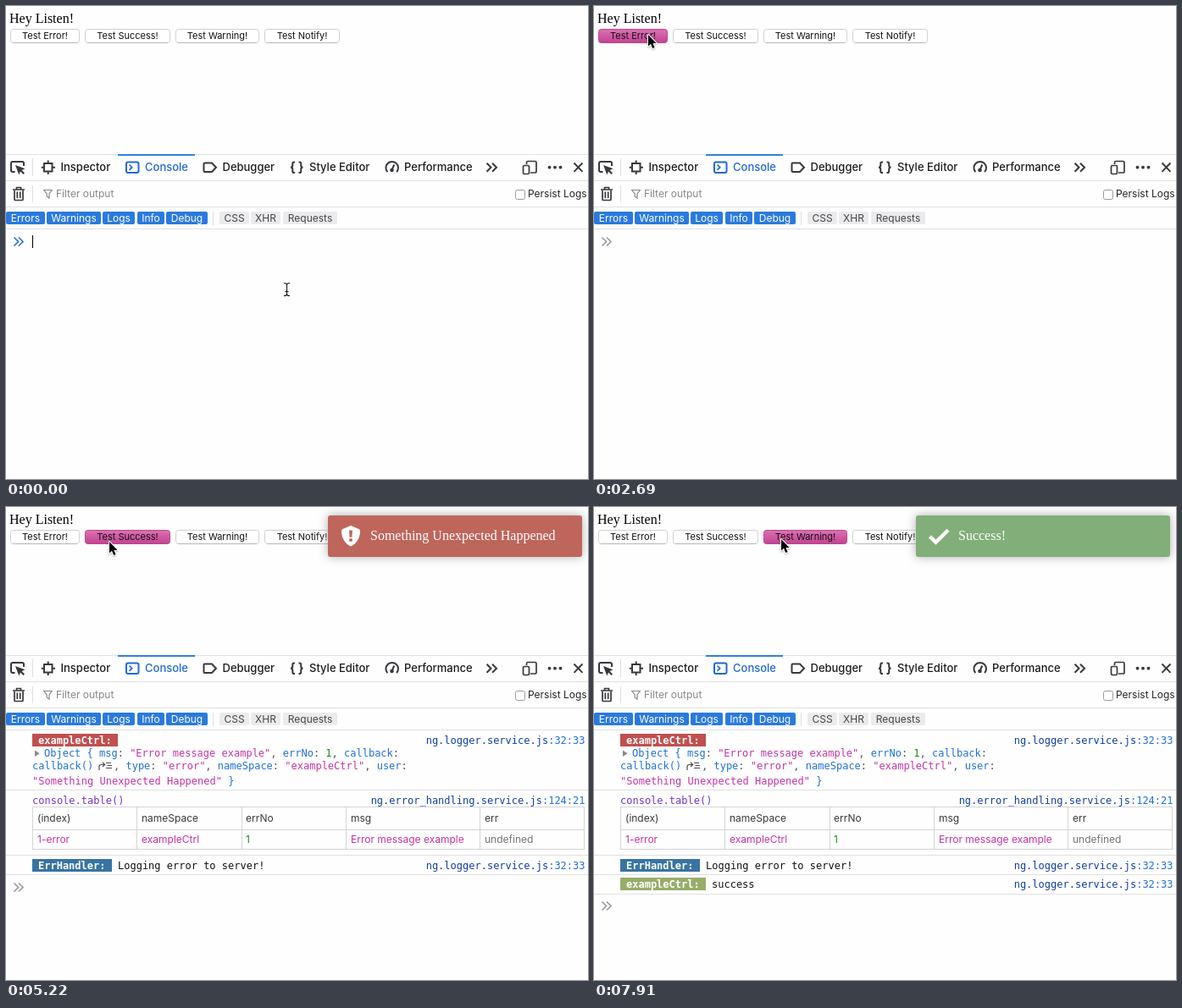
Animation of 687 by 559 pixels, one loop 8000 ms. Source, as an HTML page with a canvas:

```html
<!DOCTYPE html>
<html lang="en">
<head>
<meta charset="utf-8">
<title>Logger console demo</title>
<style>
html, body { margin: 0; width: 100%; height: 100%; overflow: hidden; background: #fefefe; }
canvas { display: block; }
</style>
</head>
<body>
<canvas id="stage" width="687" height="559"></canvas>
<script>
const c = document.getElementById('stage').getContext('2d');
const LOOP = 8000;
const UI = 'Inter, sans-serif', MONO = '"DejaVu Sans Mono", monospace', SERIF = '"Liberation Serif", serif';
const INK = '#38383d', BLUE = '#2268d8', KEY = '#1f70dd', PINK = '#c533a4', GREEN = '#198a14', LINE = '#e0e0e2';

// Pointer places: [start ms, x, y]
const POINTER = [
  [0, 331, 335], [1050, 329, 331], [1200, 311, 305], [1350, 272, 235], [1490, 212, 154],
  [1640, 84, 107], [1790, 74, 88], [1940, 66, 56], [2090, 63, 36], [2240, 64, 34],
  [4490, 67, 36], [4636, 79, 41], [4780, 98, 42], [4930, 114, 42], [5070, 122, 41],
  [6410, 126, 40], [6560, 152, 38], [6710, 190, 37], [6860, 214, 38], [7010, 221, 38]
];
const BUTTONS = [
  { label: 'Test Error!', x: 5, w: 82, press: [2690, 2840] },
  { label: 'Test Success!', x: 93, w: 101, press: [5220, 5670] },
  { label: 'Test Warning!', x: 200, w: 99, press: [7910, LOOP] },
  { label: 'Test Notify!', x: 305, w: 89, press: [LOOP, LOOP] }
];
const within = (t, [a, b]) => t >= a && t < b;

function text(s, x, y, font, color, align = 'left') {
  c.font = font;
  c.fillStyle = color;
  c.textAlign = align;
  c.fillText(s, x, y);
}

function rect(x, y, w, h, color) {
  c.fillStyle = color;
  c.fillRect(x, y, w, h);
}

function box(x, y, w, h, r, fill, stroke) {
  c.beginPath();
  c.roundRect(x, y, w, h, r);
  if (fill) { c.fillStyle = fill; c.fill(); }
  if (stroke) { c.strokeStyle = stroke; c.stroke(); }
}

function stroke(d, color, width = 2) {
  c.strokeStyle = color;
  c.lineWidth = width;
  c.stroke(new Path2D(d));
  c.lineWidth = 1;
}

function fill(d, color) {
  c.fillStyle = color;
  c.fill(new Path2D(d));
}

// Coloured monospace pieces: color, string, color, string...
function run(x, y, ...parts) {
  c.font = '12px ' + MONO;
  c.textAlign = 'left';
  for (let i = 0; i < parts.length; i += 2) {
    c.fillStyle = parts[i];
    c.fillText(parts[i + 1], x, y);
    x += c.measureText(parts[i + 1]).width;
  }
}

function source(file, pos, y) {
  c.font = '12px ' + MONO;
  run(683.5 - c.measureText(file + pos).width, y, '#103f9f', file, KEY, pos);
}

function badge(label, y, w, color) {
  rect(31, y - 12, w, 15, color);
  text(label, 38, y, 'bold 12px ' + MONO, '#fff');
}

function chevrons(x, y, h, step, color, width) {
  const one = `l${h} ${h}l${-h} ${h}`;
  stroke(`M${x} ${y - h}${one}M${x + step} ${y - h}${one}`, color, width);
}

function page(t) {
  text('Hey Listen!', 4, 20, '16px ' + SERIF, '#000');
  for (const b of BUTTONS) {
    const down = within(t, b.press);
    let face = '#fff';
    if (down) {
      face = c.createLinearGradient(0, 27, 0, 44);
      face.addColorStop(0, '#dc72b4');
      face.addColorStop(1, '#c1428f');
    }
    box(b.x + .5, 27.5, b.w - 1, 16, 3, face, down ? '#b9478c' : '#d0d0d0');
    if (!down) rect(b.x + 3, 43, b.w - 6, 1, '#b8b8b8');
    text(b.label, b.x + b.w / 2, 39, '11px ' + UI, '#111', 'center');
  }
}

function tabs() {
  for (const y of [175, 206, 237, 263]) rect(0, y, 687, 1, LINE);
  rect(31, 180, 1, 21, LINE);
  rect(31, 212, 1, 20, LINE);
  rect(132, 175, 91, 2, '#2f80e0');

  stroke('M10.5 196H8a2 2 0 0 1-2-2V186a2 2 0 0 1 2-2H19a2 2 0 0 1 2 2V189', INK);
  fill('M11 188L22.5 192.3L18.6 194L22 197.4L20.4 199L17 195.6L15.3 199.5Z', INK);
  stroke('M45 186H54.5V195.5H45ZM49.7 182.5V186M49.7 195.5V199M41.8 190.7H45M54.5 190.7H58', INK);
  c.lineWidth = 2;
  box(142, 184.5, 14.5, 12.5, 2, null, BLUE);
  stroke('M145.5 187.5L148.7 190.7L145.5 193.9', BLUE, 1.7);
  stroke('M234.5 185.5H243L248 190.7L243 196H234.5Q233.5 196 233.5 195V186.5Q233.5 185.5 234.5 185.5Z', INK);
  stroke('M341 184.5H340Q338.3 184.5 338.3 186.3V188.6Q338.3 190.7 336 190.7Q338.3 190.7 338.3 192.8V195.2Q338.3 197 340 197H341' +
    'M345.5 184.5H346.5Q348.2 184.5 348.2 186.3V188.6Q348.2 190.7 350.5 190.7Q348.2 190.7 348.2 192.8V195.2Q348.2 197 346.5 197H345.5', INK);
  stroke('M450.3 196.2A7.3 7.3 0 1 1 461.1 196.2M455.7 193.5L458.2 187.5', INK);
  c.beginPath();
  c.arc(455.5, 194, 2.3, 0, 7);
  c.fillStyle = INK;
  c.fill();
  chevrons(567.5, 190.7, 5, 6.5, INK, 2);
  stroke('M614.5 187V185a1.5 1.5 0 0 1 1.5-1.5H624.5a1.5 1.5 0 0 1 1.5 1.5V195.5a1.5 1.5 0 0 1-1.5 1.5H619', INK, 1.7);
  c.lineWidth = 1.7;
  box(610.5, 188.5, 7, 10, 1.5, null, INK);
  c.lineWidth = 1;
  for (const x of [641.5, 648, 654.5]) {
    c.beginPath();
    c.arc(x, 190.7, 1.9, 0, 7);
    c.fill();
  }
  stroke('M670.5 185.5L680.5 195.8M680.5 185.5L670.5 195.8', INK, 1.9);

  const font = '500 13px ' + UI;
  text('Inspector', 64.5, 195, font, '#1c1c1f');
  text('Console', 164, 195, font, BLUE);
  text('Debugger', 255.5, 195, font, '#1c1c1f');
  text('Style Editor', 358, 195, font, '#1c1c1f');
  text('Performance', 470, 195, font, '#1c1c1f');
}

function filters() {
  stroke('M8 217H22M12.5 216.5V214.5H17.5V216.5M10 218V228.5Q10 229.5 11 229.5H19Q20 229.5 20 228.5V218M13.3 219.5V227M16.7 219.5V227', INK, 1.7);
  stroke('M44.7 217.5H54.3L51 222V227L48.2 225V222Z', '#8a8a8f', 1.2);
  text('Filter output', 59, 226, '12px ' + UI, '#88888c');
  box(601.5, 217.5, 11, 11, 2, '#fff', '#9a9a9e');
  text('Persist Logs', 616, 226, '12px ' + UI, '#242427');

  const chip = (s, x, w, on) => {
    box(x, 243, w, 15, 2, on ? '#2a7ade' : '#ebebed');
    text(s, x + w / 2, 255, '12px ' + UI, on ? '#fff' : '#454549', 'center');
  };
  chip('Errors', 0, 46, true);
  chip('Warnings', 48, 64, true);
  chip('Logs', 114, 38, true);
  chip('Info', 155, 32, true);
  chip('Debug', 189, 49, true);
  rect(244, 243, 1, 16, LINE);
  chip('CSS', 252, 35);
  chip('XHR', 289, 35);
  chip('Requests', 327, 64);
}

function errorLog() {
  badge('exampleCtrl:', 280, 101, '#c14f4f');
  source('ng.logger.service.js', ':32:33', 280);
  fill('M34 287.5L39.5 291.3L34 295Z', '#88888c');
  const sep = '#55555a';
  run(45, 295, KEY, 'Object { msg', sep, ': ', PINK, '"Error message example"', sep, ', ', KEY, 'errNo', sep, ': ',
    GREEN, '1', sep, ', ', KEY, 'callback', sep, ':');
  run(31, 310, KEY, 'callback()');
  stroke('M110 311V307Q110 304.5 112.5 304.5H116M114 302L116.7 304.5L114 307M118 302.5H124M119.5 305.5H125M118 308.5H125', '#4a4a4f', 1.2);
  run(127, 310, sep, ', ', KEY, 'type', sep, ': ', PINK, '"error"', sep, ', ', KEY, 'nameSpace', sep, ': ',
    PINK, '"exampleCtrl"', sep, ', ', KEY, 'user', sep, ':');
  run(31, 328, PINK, '"Something Unexpected Happened"', KEY, ' }');
  rect(0, 334, 687, 1, LINE);

  run(31, 351, '#6d35c9', 'console.table()');
  source('ng.error_handling.service.js', ':124:21', 351);
  for (const y of [354, 381, 404]) rect(31, y, 652, 1, '#d4d4d7');
  for (const x of [31, 154, 278, 401, 559, 682]) rect(x, 354, 1, 51, '#d4d4d7');
  const cells = [
    [37, '(index)', '1-error', PINK], [160, 'nameSpace', 'exampleCtrl', PINK], [283, 'errNo', '1', GREEN],
    [407, 'msg', 'Error message example', PINK], [565, 'err', 'undefined', '#737377']
  ];
  for (const [x, head, value, color] of cells) {
    text(head, x, 372, '12px ' + UI, INK);
    text(value, x, 397, '12px ' + UI, color);
  }
  rect(0, 411, 687, 1, LINE);

  badge('ErrHandler:', 428, 94, '#3874a2');
  run(132, 428, '#111', 'Logging error to server!');
  source('ng.logger.service.js', ':32:33', 428);
  rect(0, 434, 687, 1, LINE);
}

function successLog() {
  badge('exampleCtrl:', 450, 101, '#98ad69');
  run(139, 450, '#111', 'success');
  source('ng.logger.service.js', ':32:33', 450);
  rect(0, 457, 687, 1, LINE);
}

function prompt(t) {
  const y = t < 2990 ? 278.5 : t < 5810 ? 449.5 : 471.5;
  chevrons(9.5, y, 5, 5.5, t < 2690 ? '#2a72da' : '#9b9b9f', 1.7);
  if (t < 450 || within(t, [1050, 1490]) || within(t, [2090, 2690])) rect(31, 271, 1, 15, '#000');
}

function toast(y, color, label) {
  c.save();
  c.shadowColor = 'rgba(153,153,153,.8)';
  c.shadowBlur = 12;
  box(380, y, 300, 49, 3, color);
  c.restore();
  text(label, 430, y + 29, '16px ' + SERIF, '#fff');
}

function toasts(t) {
  const red = '#be665c', hasSuccess = t >= 5670;
  if (hasSuccess) {
    toast(10, '#82ae79', 'Success!');
    if (t >= 5810) stroke('M396.5 34.8L403.5 41.6L418 27.2', '#fff', 4.4);
  }
  if (!within(t, [2840, 7910])) return;
  const y = hasSuccess ? 65 : 10;
  toast(y, red, 'Something Unexpected Happened');
  if (t < 2990) return;
  c.save();
  c.translate(407, y + 12);
  fill('M0 0L9.5 4Q11 4.6 11 6.2C11 15 6.5 21.5 0 24.5C-6.5 21.5-11 15-11 6.2Q-11 4.6-9.5 4Z', '#fff');
  fill('M-2 5.5H2L1.4 13.8H-1.4Z', red);
  c.beginPath();
  c.arc(0, 17, 2, 0, 7);
  c.fill();
  c.restore();
}

function pointer(t) {
  const [, x, y] = POINTER.findLast(p => p[0] <= t);
  c.save();
  c.translate(x, y);
  if (y > 263) {
    const beam = 'M-3 -7.5Q.5 -7.5 .5 -5.5V5.5Q.5 7.5 -3 7.5M4 -7.5Q.5 -7.5 .5 -5.5M.5 5.5Q.5 7.5 4 7.5M-1.5 2.5H2.5';
    stroke(beam, '#fff', 2.5);
    stroke(beam, '#111', 1.1);
  } else {
    const arrow = 'M0 0V13.6L3 10.8L5.2 16L7.6 15L5.4 9.9H9.6Z';
    c.lineJoin = 'round';
    c.shadowColor = 'rgba(0,0,0,.3)';
    c.shadowBlur = 2;
    c.shadowOffsetY = 1;
    stroke(arrow, '#fff', 2);
    c.shadowColor = 'transparent';
    fill(arrow, '#000');
  }
  c.restore();
}

function draw(now) {
  const t = now % LOOP;
  rect(0, 0, 687, 559, '#fefefe');
  page(t);
  tabs();
  filters();
  if (t >= 2990) errorLog();
  if (t >= 5810) successLog();
  prompt(t);
  toasts(t);
  pointer(t);
}

let start;
function tick(now) {
  start ??= now;
  draw(now - start);
  requestAnimationFrame(tick);
}
requestAnimationFrame(tick);
</script>
</body>
</html>
```
